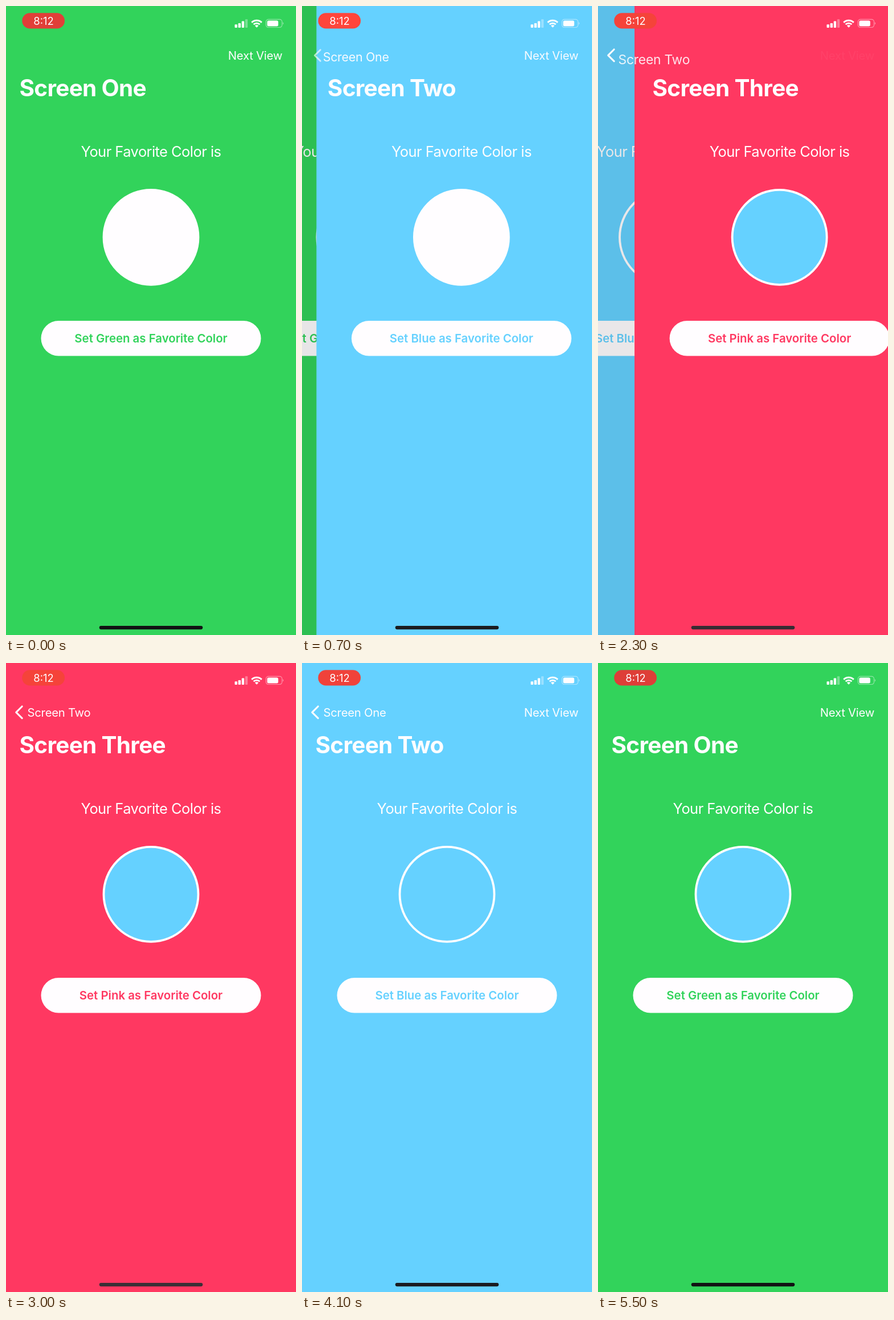
An HTML page for the animation above (5600 ms loop, 509 px wide and 1101 px high).

```html
<!DOCTYPE html>
<html lang="en">
<head>
<meta charset="utf-8">
<title>Favorite Color</title>
<style>
  html, body { margin: 0; width: 100%; height: 100%; overflow: hidden; background: #32d35b; }
  svg { display: block; width: 509px; height: 1101px; }
  text {
    font-family: Inter, Roboto, "Liberation Sans", sans-serif;
    font-optical-sizing: none;
    fill: #fffdff;
    white-space: pre;
  }
  .title { font-size: 40.5px; font-weight: 700; letter-spacing: -0.7px; }
  .bar { font-size: 20.3px; letter-spacing: -0.25px; }
  .lead { font-size: 25.5px; letter-spacing: -0.55px; }
  .button { font-size: 20.4px; font-weight: 600; }
  .time { font-size: 18.4px; }
  .mid { text-anchor: middle; }
  .end { text-anchor: end; }
</style>
</head>
<body>
<svg id="stage" viewBox="0 0 509 1101">
  <defs>
    <linearGradient id="fadeR" gradientUnits="userSpaceOnUse" x1="476" y1="0" x2="501" y2="0">
      <stop offset="0" stop-color="#fff"/><stop offset="1" stop-color="#000"/>
    </linearGradient>
    <linearGradient id="fadeL" gradientUnits="userSpaceOnUse" x1="14" y1="0" x2="30" y2="0">
      <stop offset="0" stop-color="#000"/><stop offset="1" stop-color="#fff"/>
    </linearGradient>
    <mask id="maskR" maskUnits="userSpaceOnUse" x="0" y="0" width="509" height="220">
      <rect width="509" height="220" fill="url(#fadeR)"/>
    </mask>
    <mask id="maskL" maskUnits="userSpaceOnUse" x="0" y="0" width="509" height="220">
      <rect width="509" height="220" fill="url(#fadeL)"/>
    </mask>
  </defs>
  <g id="screens"></g>
  <g id="nav">
    <path id="chevron" d="M28.2 76 L17.8 86.3 L28.2 96.6" fill="none" stroke="#fffdff"
      stroke-width="3.1" stroke-linecap="round" stroke-linejoin="round"/>
    <text id="next" class="bar end" x="485" y="93.7">Next View</text>
  </g>
  <g id="status" fill="#fffdff">
    <rect id="pill" x="28.3" y="12.2" width="74.7" height="27.3" rx="13.6"/>
    <text class="time mid" x="66" y="32.6">8:12</text>
    <rect x="401.5" y="32.3" width="4.4" height="5.6" rx="1"/>
    <rect x="407.6" y="30" width="4.4" height="7.9" rx="1"/>
    <rect x="413.7" y="26.6" width="4.4" height="11.3" rx="1"/>
    <rect x="419.8" y="23.2" width="4.4" height="14.7" rx="1" opacity=".35"/>
    <g fill="none" stroke="#fffdff" stroke-width="2.9">
      <path d="M431.2 28.9 A12.6 12.6 0 0 1 448.8 28.9"/>
      <path d="M434.6 32.3 A7.7 7.7 0 0 1 445.4 32.3"/>
    </g>
    <path d="M436.8 34.5 A4.6 4.6 0 0 1 443.2 34.5 L440 37.8 Z"/>
    <rect x="456.3" y="23.3" width="28.2" height="14.2" rx="4.4" fill="none" stroke="#fffdff" stroke-width="1.2" opacity=".45"/>
    <rect x="458.4" y="25.4" width="19.4" height="10" rx="2.5"/>
    <path d="M485.9 28 Q488.4 30.4 485.9 32.8 Z" opacity=".5"/>
  </g>
  <rect id="home" x="163.7" y="1085" width="181.6" height="6.2" rx="3.1"/>
</svg>
<script>
const W = 509, H = 1101, LOOP = 5600, STEP = 100;
const WHITE = '#fffdff', BLUE = '#65d1ff';
const SCREENS = [
  { name: 'One', color: 'Green', bg: '#32d35b', home: [17, 18, 19] },
  { name: 'Two', color: 'Blue', bg: BLUE, home: [27, 27, 31] },
  { name: 'Three', color: 'Pink', bg: '#ff3861', home: [58, 47, 54] }
];
// low: index of the lower screen of the pair
const MOVES = [
  { at: 440, low: 0, push: true },
  { at: 2103, low: 1, push: true },
  { at: 3310, low: 1, push: false },
  { at: 4358, low: 0, push: false }
];
const SET_AT = 1400;
const PRESS = { 1300: 0.25, 1400: 0.5, 1500: 0.88 };

const $ = id => document.getElementById(id);
const clamp = v => Math.max(0, Math.min(1, v));
const mix = (a, b, k) => a.map((v, i) => Math.round(v + (b[i] - v) * k));
const rgb = c => `rgb(${c})`;

function add(parent, tag, attrs, label) {
  const el = document.createElementNS('http://www.w3.org/2000/svg', tag);
  for (const key in attrs) el.setAttribute(key, attrs[key]);
  if (label) el.textContent = label;
  return parent.appendChild(el);
}

function buildScreen({ color, bg }) {
  const g = add($('screens'), 'g', {});
  add(g, 'rect', { width: W, height: H, fill: bg });
  add(g, 'text', { class: 'lead mid', x: 254.5, y: 264.2 }, 'Your Favorite Color is');
  const dot = add(g, 'circle', { cx: 254.5, cy: 404.8, r: 83, stroke: WHITE, 'stroke-width': 3.8 });
  add(g, 'rect', { x: 61.5, y: 551, width: 386, height: 61.5, rx: 30.7, fill: WHITE });
  const label = add(g, 'text', { class: 'button mid', x: 254.5, y: 589.2, style: `fill:${bg}` },
    `Set ${color} as Favorite Color`);
  const dim = add(g, 'rect', { width: W, height: H });
  return { g, dot, label, dim };
}

// Text whose origin is its left edge at mid cap height
function buildText(cls, shift, name) {
  const holder = add($('nav'), 'g', {});
  const el = add(holder, 'text', { class: cls, x: -1.5, y: shift }, 'Screen ' + name);
  return { holder, el };
}

const views = SCREENS.map(buildScreen);
const titles = SCREENS.map(s => buildText('title', 14.7, s.name));
const labels = SCREENS.slice(0, 2).map(s => buildText('bar', 7.4, s.name));

function place({ holder, el }, x, y, scale, alpha, mask) {
  el.setAttribute('transform', `translate(${x} ${y}) scale(${scale})`);
  el.setAttribute('opacity', clamp(alpha));
  if (mask) holder.setAttribute('mask', `url(#${mask})`);
  else holder.removeAttribute('mask');
}

function hideNav() {
  for (const item of [...titles, ...labels]) item.el.setAttribute('opacity', 0);
}

function drawScreens(low, cover, t) {
  const fav = t >= SET_AT ? BLUE : WHITE;
  views.forEach((v, i) => {
    const x = i === low ? -0.3 * W * cover : W * (1 - cover);
    v.g.setAttribute('display', i === low || i === low + 1 ? 'inline' : 'none');
    v.g.setAttribute('transform', `translate(${x} 0)`);
    v.dim.setAttribute('opacity', i === low ? 0.1 * cover : 0);
    v.dot.setAttribute('fill', fav);
  });
  views[1].label.setAttribute('opacity', PRESS[t] || 1);
}

// r: part of the move still to go, p: part done
function drawNav(low, push, r, p, cover) {
  const lowTitle = titles[low], topTitle = titles[low + 1], back = labels[low];
  hideNav();
  if (push) {
    place(lowTitle, 25 + 14 * p, 143 - 57 * p, 1 - 0.52 * p, 1 - 2 * p);
    place(topTitle, 25 + 72 * Math.pow(r / 0.126, 1.31), 143, 1, 1);
    place(back, 39 - 14 * r, 86.3 + 60 * r, 1 + 1.05 * r, 1 - r);
  } else {
    place(lowTitle, 25 + 15 * r, 143 - 65 * r, 1 - 0.58 * r, 1 - 0.95 * r);
    place(topTitle, 25 + W * p - 95 * r * p, 143, 1, r, p > 0.01 && 'maskR');
    place(back, 39 - 14 * p, 86.3 + 57 * p, 1 + 1.05 * p, 1 - 2 * p);
  }
  if (low === 1) place(labels[0], 39 - 173 * cover, 86.3, 1, 1 - Math.pow(cover, 1.5), 'maskL');

  const first = low === 0;
  const slide = first && push ? r : 0;
  $('chevron').setAttribute('opacity', !first ? 1 : clamp(push ? 1 - 7 * r : 1 - 1.5 * p));
  $('chevron').setAttribute('transform', `translate(${110 * slide} ${90 * slide}) scale(${1 - slide})`);

  const gone = Math.pow(r, 1.5);
  $('next').setAttribute('opacity', first ? 1 - 0.77 * r * p : push ? gone : 1 - gone);
}

function draw(t) {
  const move = MOVES.filter(m => m.at <= t).pop() || MOVES[0];
  const { low, push } = move;
  const wt = 0.01826 * Math.max(0, t - move.at);
  const r = (1 + wt) * Math.exp(-wt), p = 1 - r;
  const cover = push ? p : r;
  drawScreens(low, cover, t);
  drawNav(low, push, r, p, cover);

  const glow = 0.5 - 0.5 * Math.cos((t + 200) / 1900 * 2 * Math.PI);
  $('pill').setAttribute('fill', rgb(mix([222, 62, 56], [255, 69, 59], glow)));
  $('home').setAttribute('fill', rgb(mix(SCREENS[low].home, SCREENS[low + 1].home, cover)));
}

const start = performance.now();
function tick() {
  const t = (performance.now() - start) % LOOP;
  draw(Math.floor(t / STEP) * STEP);
  requestAnimationFrame(tick);
}
tick();
</script>
</body>
</html>
```
